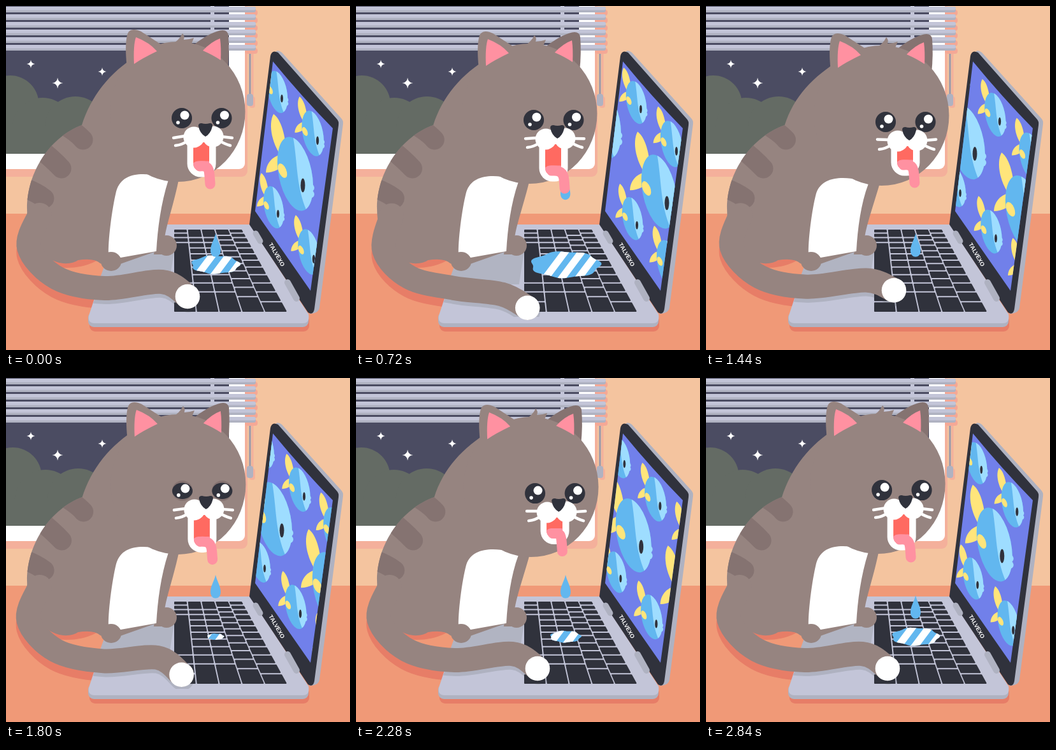
Write an HTML page with a canvas that moves like this. It is 540x540 px and loops after 2.88 s.

```html
<!DOCTYPE html>
<html lang="en">
<head>
<meta charset="utf-8">
<title>Cat at a laptop</title>
<style>
html, body { margin: 0; width: 100%; height: 100%; overflow: hidden; background: #f4c49f; }
canvas { display: block; }
</style>
</head>
<body>
<canvas id="stage" width="540" height="540"></canvas>
<script>
const ctx = document.getElementById('stage').getContext('2d');
const LOOP = 2880, BEAT = 960, FRAME = 40, TAU = Math.PI * 2;
const FUR = '#968480', DARK_FUR = '#857371', INK = '#30323c', BLUE = '#62b7ef',
  SILVER = '#c3c5d8', STEEL = '#afb2c1', CORAL = '#e77d67', PINK = '#ff91a1', WHITE = '#fff';

const clamp = v => Math.max(0, Math.min(1, v));
const wave = (t, peak, period = BEAT) => Math.cos(TAU * (t - peak) / period);
// Smooth rise from 0 to 1 and back, reaching half the given width to each side of the peak
const bump = (t, peak, reach) => 0.5 + 0.5 * Math.cos(Math.PI * clamp(Math.abs(t - peak) / reach));

function fill(color, path) {
  ctx.fillStyle = color;
  ctx.fill(typeof path === 'string' ? new Path2D(path) : path);
}
function line(color, width, path) {
  ctx.strokeStyle = color;
  ctx.lineWidth = width;
  ctx.lineCap = ctx.lineJoin = 'round';
  ctx.stroke(typeof path === 'string' ? new Path2D(path) : path);
}
function rect(color, x, y, w, h, r = 0) {
  const p = new Path2D();
  p.roundRect(x, y, w, h, r);
  fill(color, p);
}
function oval(color, x, y, rx, ry = rx, turn = 0) {
  const p = new Path2D();
  p.ellipse(x, y, rx, ry, turn, 0, TAU);
  fill(color, p);
}
function group(x, y, draw, scale = 1) {
  ctx.save();
  ctx.translate(x, y);
  ctx.scale(scale, scale);
  draw();
  ctx.restore();
}
function clipped(path, draw) {
  ctx.save();
  ctx.clip(typeof path === 'string' ? new Path2D(path) : path);
  draw();
  ctx.restore();
}

// Room
function drawRoom(t) {
  rect('#f4c49f', 0, 0, 540, 540);
  rect('#f09977', 0, 326, 540, 214);
  rect('#f4b09b', -20, -20, 399, 288, 9);
  rect(WHITE, -20, -20, 395, 276, 9);
  rect('#4b4c62', 0, 0, 350, 232);
  const sway = -2.5 * wave(t, 0, LOOP);
  clipped('M0 0H350V232H0Z', () => {
    oval('#646b64', 9 + sway, 154, 45);
    oval('#646b64', 60 + sway, 192, 48);
    oval('#646b64', 111.5 + sway, 190, 48);
    rect('#646b64', 0, 190, 155, 42);
  });
  for (const [x, y, r] of [[39, 91, 6.5], [81, 121, 8.5], [151, 103, 6.5]])
    group(x, y, () => fill(WHITE, 'M0-1Q.1-.1 1 0Q.1.1 0 1Q-.1.1-1 0Q-.1-.1 0-1Z'), r);

  line('#f4b09b', 3, 'M387 70V145');
  rect('#f4b09b', 382, 142, 9, 18, 4);
  line('#9b9aaa', 3, 'M383 66V142');
  rect(STEEL, 378, 138, 10, 19, 4);
  rect(SILVER, 321, 0, 6, 64);
  for (let y = 1; y < 70; y += 12) {
    rect('#f4a896', 375, y + 5, 20, 9, 4);
    rect(STEEL, -9, y, 401, 9, 3);
    rect(SILVER, -9, y, 401, 5.5, 3);
  }
}

// Laptop
const DECK = 'M177 343H383L475 488H130Z';
const DISPLAY = 'M419 87Q465 143 513 192L478 447L391 322Z';
const COLUMNS = 5, ROWS = 12, ROW_GROWTH = 1.09;

const rowY = r => 351 + 131 * (ROW_GROWTH ** r - 1) / (ROW_GROWTH ** ROWS - 1);
const columnX = (col, y) => 264 + col * (21.6 + (y - 351) * 0.11);

function drawKey(col, from, to) {
  const top = rowY(from) + 1, low = rowY(to) - 3;
  const left = y => columnX(col, y) + 1, right = y => columnX(col + 1, y) - 3;
  const key = new Path2D(`M${left(top)} ${top}H${right(top)}L${right(low)} ${low}H${left(low)}Z`);
  fill(INK, key);
  line(INK, 2, key);
}

// Every column ends in larger keys; the last ones shrink in steps of half a row
function drawKeys() {
  for (let col = 0; col < COLUMNS; col++) {
    const end = col ? 2 - Math.max(0, col - 2) / 2 : 1;
    let from = 0;
    for (let to = end; to <= ROWS - end; to++) {
      const underSpace = col === 0 && to > 3 && to < 9;
      if (underSpace) continue;
      drawKey(col, from, to);
      from = to;
    }
    drawKey(col, from, ROWS);
  }
}

function drawFish(x, y, scale) {
  group(x, y, () => {
    fill('#ffe57b', 'M-28-38C-49-62-55-96-46-112C-32-102-26-70-26-45Z');
    fill('#ffe57b', 'M-26-48C-44-51-58-36-58-20C-45-20-32-27-26-38Z');
    const body = new Path2D();
    body.ellipse(-12, -18, 26, 59, -0.2, 0, TAU);
    fill(BLUE, body);
    clipped(body, () => fill('#9eddff', 'M-16-80C-7-30-12 0 8 45H50V-80Z'));
    oval('#9eddff', 12, 4, 6);
    oval('#9eddff', 12, 14, 6);
    oval('#ffe57b', -32, -23, 6, 12, -0.4);
    oval(INK, 0, 0, 3.5, 11);
  }, scale);
}

function drawDisplay(t) {
  const u = t / LOOP, bob = 1.3 + 3.7 * wave(t, 370);
  fill('#7180ea', DISPLAY);
  clipped(DISPLAY, () => {
    for (const lap of [-1, 0, 1]) {
      const v = u + lap, small = 0.57 * (1 + 0.08 * v);
      drawFish(433 + 56 * v, 146 + 66 * v + bob * 0.55, small);
      drawFish(427 + 56 * v, 327 + 71 * v + bob * 0.55, small);
      drawFish(466 + 88 * v, 283 + 110 * v + bob, 1);
    }
  });
}

function drawLaptop(t, tail) {
  rect(CORAL, 131, 486, 345, 25, 9);
  rect(STEEL, 129, 480, 346, 24, 9);
  fill(SILVER, 'M177 343H383L475 484Q477 498 466 498H139Q128 498 130 486Z');
  fill('#b1b4c2', 'M163 384H264L256 437H144Z');
  clipped(DECK, () => group(1, 6, () => line(STEEL, 38, tail)));
  drawKeys();

  fill(STEEL, 'M424 71Q428 69 433 73L526 176Q530 180 529 186L492 474Q490 483 476 483Z');
  fill(INK, 'M415 79Q417 68 427 73L519 177Q523 181 522 187L484 476Q482 486 474 481L382 343Z');
  drawDisplay(t);
  line(STEEL, 9, 'M392 357L399 369');
  line(STEEL, 10, 'M442 434L456 459');
  ctx.save();
  ctx.translate(424.5, 390.5);
  ctx.rotate(1.05);
  ctx.font = 'bold 9px "Liberation Sans", Arial, sans-serif';
  ctx.textAlign = 'center';
  ctx.textBaseline = 'middle';
  ctx.fillStyle = WHITE;
  ctx.fillText('TALVEXO', 0, 0);
  ctx.restore();
}

// Tail: centre lines of its three poses, blended over the loop
const TAIL_REST = [[53, 328], [36, 379], [80, 427], [155, 443], [245, 433], [285, 456]];
const TAIL_LOW = [[53, 328], [31, 386], [70, 433], [142, 452], [195, 472], [222, 521]];
const TAIL_SWIPE = [[62, 330], [72, 378], [115, 412], [180, 424], [300, 411], [369, 374]];

function tailPoints(t) {
  const low = bump(t, 590, 340) + 0.2 * bump(t, 1700, 300);
  const swipe = bump(t, 1040, 520);
  return TAIL_REST.map((point, i) => point.map((v, axis) =>
    v + low * (TAIL_LOW[i][axis] - v) + swipe * (TAIL_SWIPE[i][axis] - v)));
}

function smoothPath(points) {
  const path = new Path2D(), at = i => points[Math.max(0, Math.min(points.length - 1, i))];
  path.moveTo(...points[0]);
  for (let i = 0; i < points.length - 1; i++) {
    const [a, b, c, d] = [at(i - 1), at(i), at(i + 1), at(i + 2)];
    path.bezierCurveTo(b[0] + (c[0] - a[0]) / 6, b[1] + (c[1] - a[1]) / 6,
      c[0] - (d[0] - b[0]) / 6, c[1] - (d[1] - b[1]) / 6, c[0], c[1]);
  }
  return path;
}

// Water
function drawPuddle(t) {
  const age = (t - 1500 + LOOP) % LOOP;
  if (age > 2460) return;
  const squeeze = 20 * clamp((age - 2200) / 220);
  const rx = Math.min(age * 0.043, 13 + (age - 300) * 0.0227) - squeeze;
  const blob = new Path2D();
  for (let a = 0; a < TAU; a += 0.06) {
    const r = rx * (1 + 0.05 * Math.cos(7 * a + 0.6));
    blob.lineTo(329 - squeeze + r * Math.cos(a), 406 + 0.38 * r * Math.sin(a));
  }
  blob.closePath();
  fill(BLUE, blob);
  clipped(blob, () => {
    for (let x = 313; x < 370; x += 26) fill(WHITE, `M${x - 25} 430L${x + 11} 382H${x + 25}L${x - 11} 430Z`);
  });
}

function drawDrop(t) {
  let q = t % 480;
  if (q < 60) q += 480;
  const grow = clamp((q - 60) / 200);
  const y = q < 260 ? 279 + 9 * grow : 288 + 0.4 * (q - 260);
  const drop = () => fill(BLUE, 'M0-19C2-9 8-2 8 8C8 21-8 21-8 8C-8-2-2-9 0-19Z');
  group(326 + 3 * grow, y, drop, 0.62 + 0.38 * grow);
}

// Cat
function drawBody(h) {
  const lean = 0.75 * h;
  const body = `M${206 + h} ${78 + h}C${162 + h} ${104 + h} ${133 + lean} 143 ${119 + lean} 187
    C${70 + lean / 2} 205 33 260 33 318C33 364 55 400 90 404Q105 405 113 399Q138 395 148 404L165 410
    L236 385L255 290L300 200Z`;
  fill(FUR, body);
  clipped(body, () => {
    line(DARK_FUR, 31, `M${78 + lean} 180Q${108 + lean} 195 ${121 + lean} 210`);
    line(DARK_FUR, 31, `M${48 + h / 2} 220Q${72 + h / 2} 239 ${87 + h / 2} 255`);
    line(DARK_FUR, 31, `M18 282Q45 290 ${60 + h / 6} 302`);
  });
  fill(FUR, `M232 390C238 350 243 310 253 ${268 + h}L${272 + h / 3} ${268 + h}C264 310 251 345 249 365L255 390Z`);
  oval(FUR, 252, 376, 16);
  fill(WHITE, `M161 390C160 370 166 320 173 ${291 + h / 2}C179 ${270 + h} 196 ${264 + h} 215 ${264 + h}
    C232 ${264 + h} 245 ${268 + h} 255 ${273 + h}C243 310 238 350 236 385L180 395Z`);
  oval(FUR, 165, 401, 16, 15);
}

function drawEye(x, blink) {
  oval(DARK_FUR, x, 176, 16);
  const lid = new Path2D();
  lid.ellipse(x, 176 + 2 * blink, 16, 16 * (1 - blink), 0, 0, TAU);
  clipped(lid, () => {
    oval(INK, x, 176, 18);
    oval(WHITE, x + 4.5, 171.5 + 6 * blink, 7);
    oval(WHITE, x - 6, 183, 2.8);
  });
}

function drawMouth(t) {
  const jaw = 264.5 - 9 * wave(t, 310);
  const tipX = 321 - 3.7 * wave(t, 220), tipY = jaw + 11;
  rect(WHITE, 284.5, 200, 45, jaw - 200, [0, 0, 21, 21]);
  const mouth = `M294 214H319V${jaw - 22}Q319 ${jaw - 10} 307 ${jaw - 10}Q294 ${jaw - 10} 294 ${jaw - 22}Z`;
  fill('#ff6a61', mouth);
  clipped(mouth, () => rect(PINK, 292, jaw - 25, 34, 30, 9));
  line(PINK, 16, `M304 ${jaw - 17}C316 ${jaw - 18} ${tipX - 2} ${jaw - 15} ${tipX - 1} ${jaw - 2}L${tipX} ${tipY}`);
  oval(WHITE, 295, 206, 16.5);
  oval(WHITE, 325, 205, 16.5);
  fill('#ff6a61', 'M300 222Q309 217 310 214Q312 218 319 222Z');
}

function drawHead(t, h) {
  const blink = clamp(1 - Math.abs(t - 1900) / 125), whisker = 207 - 0.6 * h;
  fill(DARK_FUR, 'M296 60C315 45 330 39 340 38Q348 38 349 46Q351 70 348 99Z');
  fill(FUR, 'M191 104C186 70 188 45 193 40Q199 34 212 40L246 62L215 102Z');
  oval(FUR, 269.5, 166, 106, 110);
  fill(FUR, 'M258 62Q272 54 277 43Q281 47 279 53Q287 53 295 50L290 62Z');
  fill(PINK, 'M201 91C200 72 201 57 204 49Q225 57 237 71Q214 82 201 91Z');
  fill(PINK, 'M309 70Q322 56 336 51Q338 66 337 85Q325 77 309 70Z');
  drawEye(276, blink);
  drawEye(338.5, blink);
  line(WHITE, 4.5, `M263 ${whisker}L281 204M266 219Q276 218 283 213M338 205L355 ${whisker}M336 212Q342 216 352 219`);
  drawMouth(t);
  fill(INK, 'M302 188Q302 184 307 184Q313 186 320 184Q325 184 324 189Q321 201 313 205Q304 200 302 188Z');
}

function drawScene(t) {
  const h = 3 - 3 * wave(t, 0);
  const points = tailPoints(t), tail = smoothPath(points);
  drawRoom(t);
  oval(CORAL, 95, 378, 63, 33);
  clipped('M0 326H540V540H0Z', () => group(0, 13, () => line(CORAL, 38, tail)));
  drawLaptop(t, tail);
  drawPuddle(t);
  drawDrop(t);
  drawBody(h);
  line(FUR, 38, tail);
  oval(WHITE, ...points[points.length - 1], 19.3);
  group(h, h, () => drawHead(t, h));
}

function tick(now) {
  drawScene(Math.floor(now % LOOP / FRAME) * FRAME);
  requestAnimationFrame(tick);
}
drawScene(0);
requestAnimationFrame(tick);
</script>
</body>
</html>
```
